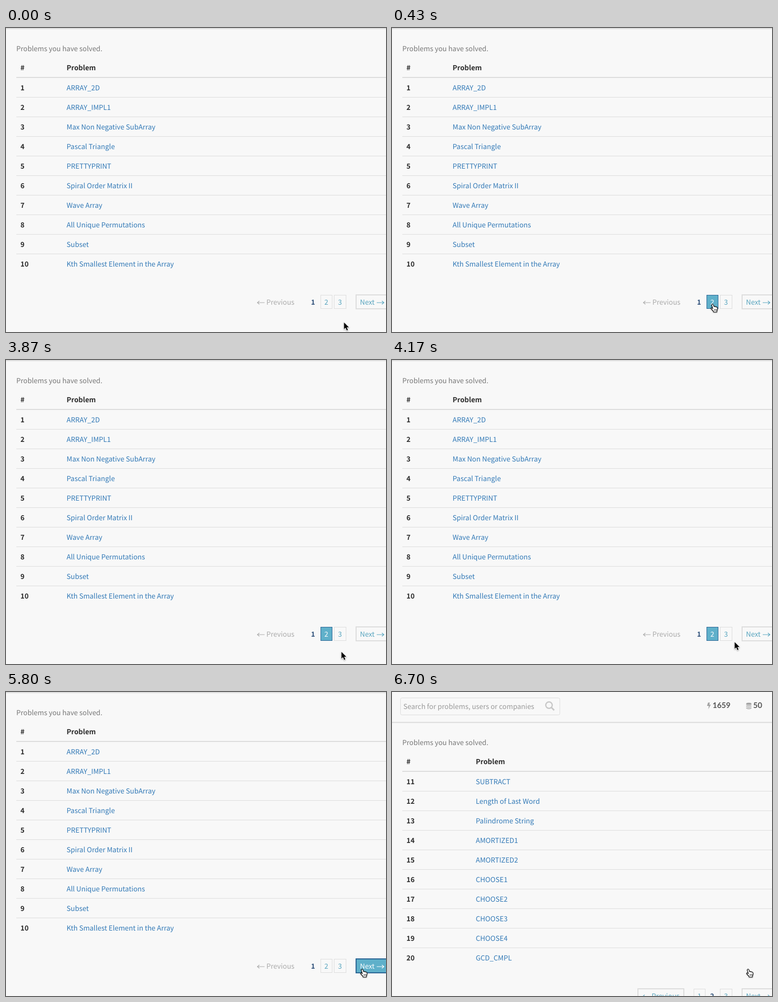
Recreate the animation shown at these times as an HTML page. Size 737 by 590 pixels, loop 8 s.

```html
<!DOCTYPE html>
<html lang="en">
<head>
<meta charset="utf-8">
<title>Solved problems</title>
<style>
html, body { margin: 0; width: 100%; height: 100%; overflow: hidden; background: #f8f8f8; }
svg { display: block; }
text {
  font: 13.43px "Noto Sans CJK JP", "Noto Sans CJK SC", "Noto Sans CJK", "Noto Sans", sans-serif;
  text-rendering: geometricPrecision;
}
.bold { font-weight: 700; }
.stat { font: 700 15px Lato, sans-serif; }
.cursor { filter: drop-shadow(0 1px 1px rgba(0, 0, 0, .35)); }
</style>
</head>
<body>
<svg id="stage" width="737" height="590" viewBox="0 0 737 590"></svg>
<script>
const LOOP = 8000;
const DARK = '#2b2b2b', LINK = '#337ab7', TEAL = '#58a5bf', RULE = '#dddddd', MUTED = '#aaaaaa';
const pages = {
  1: ['ARRAY_2D', 'ARRAY_IMPL1', 'Max Non Negative SubArray', 'Pascal Triangle', 'PRETTYPRINT',
    'Spiral Order Matrix II', 'Wave Array', 'All Unique Permutations', 'Subset',
    'Kth Smallest Element in the Array'],
  2: ['SUBTRACT', 'Length of Last Word', 'Palindrome String', 'AMORTIZED1', 'AMORTIZED2',
    'CHOOSE1', 'CHOOSE2', 'CHOOSE3', 'CHOOSE4', 'GCD_CMPL']
};

// Pointer stops: [time, x, y, is hand]
const pointer = [
  [0, 655, 571], [140, 646, 553], [290, 623, 537], [430, 617, 535, 1],
  [3430, 629, 550], [3570, 633, 557], [3720, 637, 565], [3870, 650, 566],
  [4020, 661, 551], [4170, 664, 547], [4320, 654, 563], [4470, 653, 564],
  [5210, 657, 544], [5360, 662, 541], [5510, 686, 540], [5650, 686, 538, 1], [5800, 686, 537, 1]
];
// Hovered button: [time, name]
const hovers = [[0, ''], [290, '2'], [4760, ''], [5360, '3'], [5510, 'next'], [6550, '']];

const at = (list, t) => list.filter(s => s[0] <= t).pop();
const text = (x, y, s, fill, cls = '') => `<text x="${x}" y="${y}" fill="${fill}" class="${cls}">${s}</text>`;
const rect = (x, y, w, h, fill) => `<rect x="${x}" y="${y}" width="${w}" height="${h}" fill="${fill}"/>`;
const line = (d, stroke, w) => `<path d="${d}" fill="none" stroke="${stroke}" stroke-width="${w}"/>`;

function box(x, y, w, h, border, hot) {
  const edge = border / 2;
  return `<rect x="${x + edge}" y="${y + edge}" width="${w - border}" height="${h - border}"
    fill="${hot ? '#5fb0ca' : 'none'}" stroke="${hot ? '#2b6594' : RULE}" stroke-width="${border}"/>`;
}

// Long thin arrow whose tip is at x; dir -1 points left
const arrow = (x, y, dir, color) =>
  line(`M${x} ${y}h${-14 * dir}M${x - 4 * dir} ${y - 3.2}L${x} ${y}l${-4 * dir} 3.2`, color, 1.1);

function table(page) {
  const x = page == 1 ? 117.5 : 162.5;
  let out = text(20, 45, 'Problems you have solved.', '#777777')
    + text(28, 82, '#', DARK, 'bold') + text(x, 82, 'Problem', DARK, 'bold') + rect(20, 95, 717, 2, RULE);
  pages[page].forEach((name, i) => {
    const y = 121 + 38 * i;
    out += text(28, y, (page - 1) * 10 + i + 1, DARK, 'bold') + text(x, y, name, LINK);
    if (i) out += rect(20, y - 25, 717, 1, RULE);
  });
  return out;
}

function pager(page, hover) {
  const back = page > 1, shift = back ? -1.5 : 0, backColor = back ? TEAL : MUTED;
  let out = back ? box(476, 517, 91, 29, 2) : '';
  out += arrow(487.5 + shift, 533, -1, backColor) + text(505 + shift, 537, 'Previous', backColor);
  [1, 2, 3].forEach(n => {
    const x = [585, 610, 636][n - 1], hot = hover == n;
    if (n == page) {
      out += text(n == 1 ? 591.5 : 617, 537, n, '#2d4f78', 'bold');
    } else {
      out += box(x, 518, n == 3 ? 24 : 23, 27, 1, hot)
        + text(x + (n == 3 ? 8 : 7.5), 537, n, hot ? '#fff' : TEAL);
    }
  });
  const hot = hover == 'next', color = hot ? '#fff' : TEAL;
  return out + box(678, 517, 80, 29, 2, hot) + text(686.5, 537, 'Next', color) + arrow(733, 533, 1, color);
}

function search(ready) {
  const right = ready ? 325.5 : 307.5, lens = right - 21;
  const frame = (x, w, color) =>
    `<rect x="${x}" y="11.5" width="${w}" height="33" rx="3" fill="none" stroke="${color}"/>`;
  return frame(16.5, right - 16.5, RULE)
    + (ready ? text(22, 33, 'Search for problems, users or companies', '#999999') : frame(16.5, 251, '#c2c2c2'))
    + `<circle cx="${lens}" cy="25.5" r="6.3" fill="none" stroke="#c8c8c8" stroke-width="2.4"/>`
    + line(`M${lens + 4.6} 30l5.4 5.4`, '#c8c8c8', 3);
}

function stats() {
  let out = '<path d="M613 20.5h3.6l-1.4 4h3.2l-5 9 1.1-6.5h-3.5z" fill="#a3a3a3"/>'
    + text(621.7, 31, '1659', '#555555', 'stat') + text(700.5, 31, '50', '#555555', 'stat')
    + '<ellipse cx="692" cy="22.8" rx="5.2" ry="2" fill="#a3a3a3"/>';
  for (const y of [24.4, 27.4, 30.4]) {
    out += `<path d="M686.8 ${y}q5.2 2.6 10.4 0v1.4q-5.2 3-10.4 0z" fill="#a3a3a3"/>`;
  }
  return out;
}

const navEdge = rect(0, 58, 737, 1, '#dadada') + rect(0, 59, 737, 1, '#e2e2e2') + rect(0, 60, 737, 1, '#f1f1f1');

function cursor([, x, y, hand]) {
  const shape = hand
    ? `<path d="M4 1.1C5 .6 6 1.2 6.4 2.4L7.4 5.8C8.2 5 9.2 5.3 9.7 6.1 10.5 5.5 11.5 5.9 12 6.8
        13 6.4 14 7 14.2 8.3 14.6 10.5 14 12.3 13.2 13.6L13 16.2H6.6L6.2 14.6C5 13 3.5 11.5 2 10
        1.2 9 1.8 8 3 8.2 3.8 8.4 4.6 9.2 5.2 9.7L3.1 3C2.9 2 3.2 1.4 4 1.1Z"
        fill="#fff" stroke="#000" stroke-width="1.1" stroke-linejoin="round"/>`
      + line('M8.2 10.7v3M10.1 10.6v3M12 10.5v3', '#000', .8)
    : `<path d="M.6.6V13.6L3.6 10.8 5.9 16.1 8.1 15.1 5.8 10H10Z"
        fill="#000" stroke="#fff" stroke-width="1.6" stroke-linejoin="round" paint-order="stroke"/>`;
  return `<g class="cursor" transform="translate(${x} ${y})">${shape}</g>`;
}

function scene(t) {
  const page = t < 6550 ? 1 : 2, ready = t >= 6700;
  const scroll = page == 1 ? 0 : ready ? 58 : 64;
  const nav = page == 1 ? `<g transform="translate(0 -58)">${navEdge}</g>` : navEdge + search(ready) + stats();
  return rect(0, 0, 737, 590, '#f8f8f8') + nav
    + `<g transform="translate(0 ${scroll})">${table(page)}${pager(page, at(hovers, t)[1])}</g>`
    + cursor(at(pointer, t));
}

const stage = document.getElementById('stage');
let shown = '';
function draw() {
  const next = scene(performance.now() % LOOP);
  if (next !== shown) stage.innerHTML = shown = next;
  requestAnimationFrame(draw);
}
draw();
</script>
</body>
</html>
```
